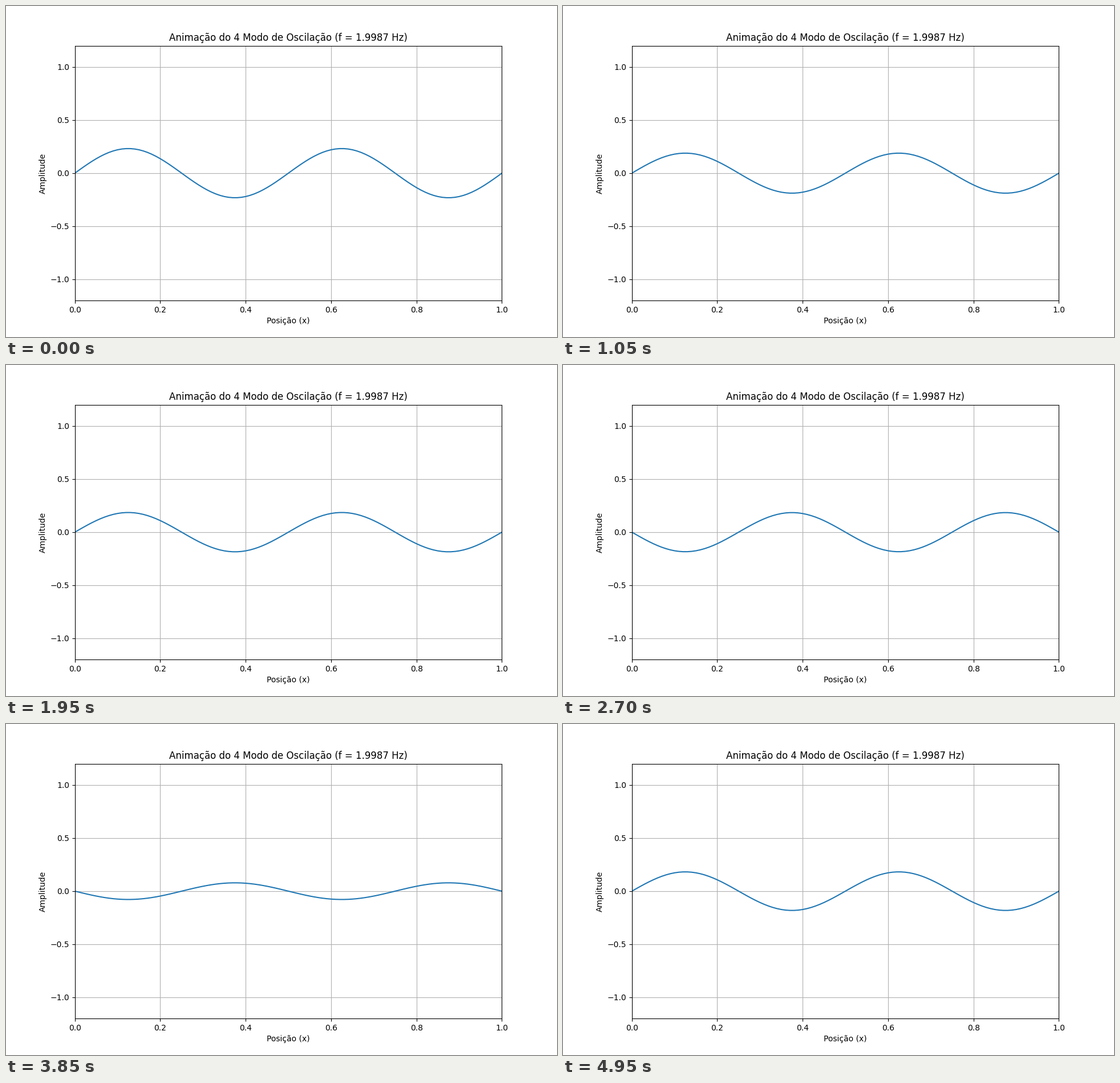
A matplotlib script for the animation above (5 s loop, 966x580 px).

```python
import numpy as np
import matplotlib.pyplot as plt
from matplotlib.animation import FuncAnimation

MODE = 4
FREQ = 1.9987       # Hz
AMPLITUDE = 0.2315
FRAMES = 100
INTERVAL = 50       # ms

x = np.linspace(0, 1, 101)
shape = AMPLITUDE * np.sin(MODE * np.pi * x)

fig, ax = plt.subplots(figsize=(9.66, 5.8), dpi=100)
line, = ax.plot(x, shape)
ax.set_xlim(0, 1)
ax.set_ylim(-1.2, 1.2)
ax.set_xlabel("Posição (x)")
ax.set_ylabel("Amplitude")
ax.set_title(f"Animação do {MODE} Modo de Oscilação (f = {FREQ:.4f} Hz)")
ax.grid(True)


def update(frame):
    t = frame * INTERVAL / 1000
    line.set_ydata(shape * np.cos(2 * np.pi * FREQ * t))
    return line,


anim = FuncAnimation(fig, update, frames=FRAMES, interval=INTERVAL,
                     repeat=True, repeat_delay=0)
plt.show()
```
